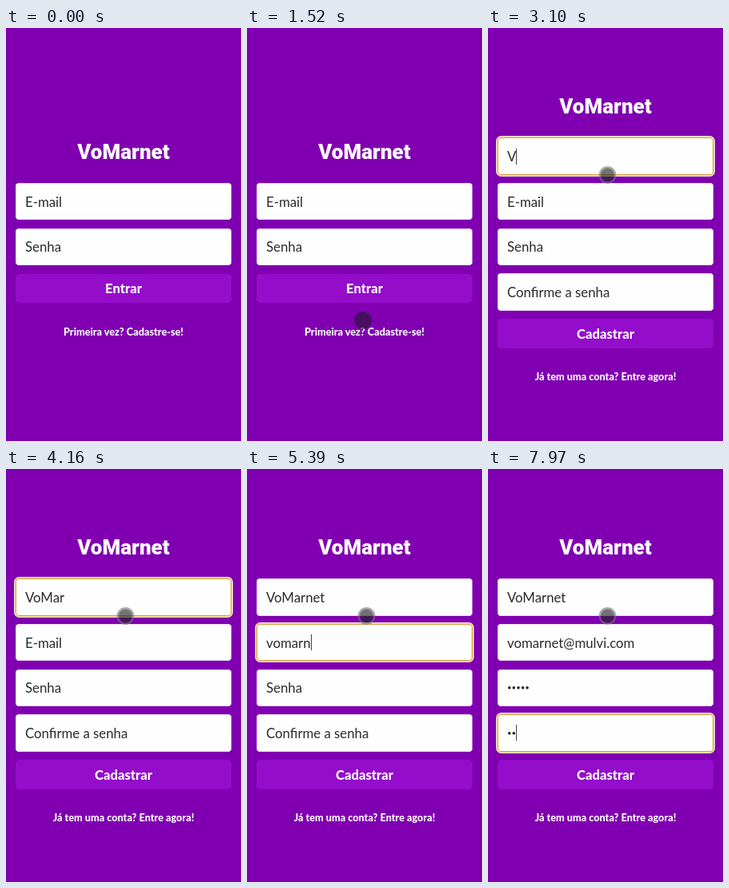
An HTML page that plays this animation: 294x517 px, repeating every 8 s.

```html
<!DOCTYPE html>
<html lang="pt-BR">
<head>
<meta charset="utf-8">
<title>VoMarnet</title>
<style>
  html, body { margin: 0; width: 100%; height: 100%; overflow: hidden; background: #8000b1; }
  #stage { position: relative; width: 294px; height: 517px; overflow: hidden; font: 16.8px Lato, "Open Sans", sans-serif; }
  #stage > * { position: absolute; box-sizing: border-box; white-space: pre; }
  .logo, .link { left: 0; width: 294px; text-align: center; color: #fff; }
  .logo { font: 900 26px/40px Roboto, sans-serif; }
  .link { font-weight: 800; font-size: 12.7px; line-height: 20px; }
  .field, .button { left: 12px; width: 270px; border-radius: 4.5px; display: flex; align-items: center; }
  .field { height: 46.4px; padding-left: 12px; background: #fefefe; color: #2b2b2b; box-shadow: inset 0 0 0 1px #f0e0f6; }
  .field.focus { box-shadow: inset 0 0 0 1px #d8a53c, 0 0 0 1px #ecd08a, 0 0 0 2px #f2e6d4; }
  .field.dots span { font-size: 9.6px; }
  .field i { width: 1px; height: 20px; background: #444; visibility: hidden; }
  .button { height: 36.8px; justify-content: center; background: #940dca; color: #fff; font-weight: 800; font-size: 16.6px; }
  #touch { left: -11px; top: -11px; width: 22px; height: 22px; border-radius: 50%;
    background: radial-gradient(circle, rgba(35,35,38,.64) 7.5px, rgba(120,120,125,.6) 9.5px); }
  #touch.over-link { background: rgba(35,25,50,.62); }
</style>
</head>
<body>
<div id="stage"></div>
<script>
const LOOP = 8000, SIGN_UP = 2160, PITCH = 56.6;
const stage = document.getElementById('stage');

// Each typing run is [first key time, interval, key count].
const fields = [
  { label: 'Nome', text: 'VoMarnet', focus: 2860, runs: [[3000, 150, 5], [4230, 115, 3]] },
  { label: 'E-mail', text: 'vomarnet@mulvi.com', focus: 4640, runs: [[4790, 118, 6], [5550, 148, 11], [7250, 0, 1]] },
  { label: 'Senha', text: '•••••', focus: 7330, dots: true, runs: [[7390, 60, 5]] },
  { label: 'Confirme a senha', text: '••', focus: 7760, dots: true, runs: [[7850, 60, 2]] }
];

// Touch positions: [time, x, y]
const path = [[420, 188, 300], [1320, 150, 358], [1520, 145, 366], [1900, 138, 378],
  [2340, 138, 378], [2780, 149.5, 184]];

function add(className, top, text = '') {
  const el = document.createElement('div');
  el.className = className;
  el.style.top = top + 'px';
  el.textContent = text;
  return stage.appendChild(el);
}

const logo = add('logo', 0, 'VoMarnet');
fields.forEach((field, i) => {
  field.el = add('field', 137.4 + i * PITCH);
  field.value = field.el.appendChild(document.createElement('span'));
  field.caret = field.el.appendChild(document.createElement('i'));
  field.keys = field.runs.flatMap(([start, step, count]) =>
    Array.from({ length: count }, (_, k) => start + k * step));
});
const button = add('button', 0);
const link = add('link', 0);
const touch = add('', 0);
touch.id = 'touch';
touch.style.top = '';

function touchAt(t) {
  const next = path.findIndex(point => point[0] > t);
  if (next < 0) return path[path.length - 1].slice(1);
  const [t0, x0, y0] = path[next - 1], [t1, x1, y1] = path[next];
  const p = (t - t0) / (t1 - t0), ease = p * p * (3 - 2 * p);
  return [x0 + (x1 - x0) * ease, y0 + (y1 - y0) * ease];
}

function drawField(field, i, t, signUp) {
  const typed = field.keys.filter(key => key <= t);
  const next = fields[i + 1];
  const focused = t >= field.focus && !(next && t >= next.focus);
  const lastAction = typed.length ? typed[typed.length - 1] : field.focus;
  field.el.style.display = signUp || i === 1 || i === 2 ? '' : 'none';
  field.el.classList.toggle('focus', focused);
  field.el.classList.toggle('dots', !!field.dots && typed.length > 0);
  field.value.textContent = typed.length ? field.text.slice(0, typed.length) : field.label;
  field.caret.style.visibility = focused && typed.length && (t - lastAction) % 1000 < 500 ? 'visible' : 'hidden';
}

function draw(t) {
  const signUp = t >= SIGN_UP;
  logo.style.top = (signUp ? 78.4 : 135) + 'px';
  button.style.top = (signUp ? 364.2 : 307.6) + 'px';
  link.style.top = (signUp ? 426.1 : 369.5) + 'px';
  button.textContent = signUp ? 'Cadastrar' : 'Entrar';
  link.textContent = signUp ? 'Já tem uma conta? Entre agora!' : 'Primeira vez? Cadastre-se!';
  fields.forEach((field, i) => drawField(field, i, t, signUp));

  const visible = t >= path[0][0];
  touch.style.display = visible ? '' : 'none';
  if (visible) {
    const [x, y] = touchAt(t);
    touch.style.transform = `translate(${x}px, ${y}px)`;
    touch.classList.toggle('over-link', y > 350);
  }
}

const begin = performance.now();
function tick() {
  draw((performance.now() - begin) % LOOP);
  requestAnimationFrame(tick);
}
tick();
</script>
</body>
</html>
```
